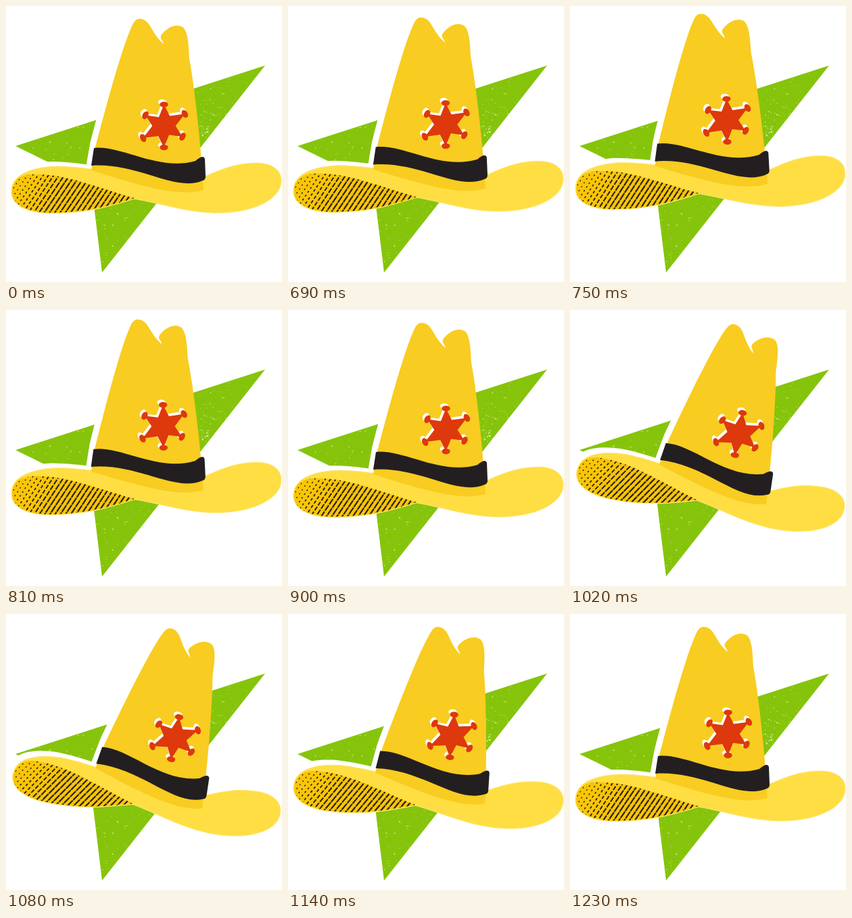
Recreate the animation shown at these times as an HTML page. Size 408 px wide and 408 px high, loop 1.8 s.

```html
<!DOCTYPE html>
<html lang="en">
<head>
<meta charset="utf-8">
<title>Sheriff hat</title>
<style>
  html, body { margin: 0; width: 100%; height: 100%; overflow: hidden; background: #fff; }
  svg { display: block; width: 100vw; height: 100vh; }
</style>
</head>
<body>
<svg viewBox="0 0 408 408">
  <defs>
    <path id="leaf" d="M14 207L383 88 142 394 126 262Z"/>
    <path id="crown" d="M126 243L132 209C150 140 172 60 186 30C190 21 193 19 198 19S208 22 212 28
      C218 38 224 49 233 56C232 50 226 48 230 42C240 30 252 26 261 31C270 38 270 62 271 78
      C278 115 288 200 292 272C255 283 200 266 126 243Z"/>
    <path id="brim" d="M8 272C10 246 44 238 75 237C150 238 240 268 294 252C325 238 345 232 372 232
      C396 233 407 244 407 258C407 284 370 306 310 306C265 305 230 292 190 285
      C150 297 120 306 70 306.5C30 307 6 294 8 272Z"/>
    <path id="under" d="M9 276C10 250 30 248 50 249C95 250 145 272 190 284
      C150 296 120 305 70 305.5C30 306 10 293 9 276Z"/>
    <g id="badge"></g>
    <clipPath id="leafClip"><use href="#leaf"/></clipPath>
    <clipPath id="underClip"><use href="#under"/></clipPath>
  </defs>
  <use href="#leaf" fill="#86c40b"/>
  <path id="specks" clip-path="url(#leafClip)" fill="#d3eaa6"/>
  <g id="hat">
    <g fill="#fff" transform="translate(-7.5 -7)">
      <use href="#crown"/><use href="#brim"/>
    </g>
    <use href="#brim" fill="#fede43" stroke="#ffe778"/>
    <use href="#under" fill="#f8c507"/>
    <g id="hatch" clip-path="url(#underClip)" stroke="#2b2112"></g>
    <use href="#crown" fill="#f8cc21"/>
    <path fill="#231f20" d="M130 210C170 205 225 245 280 229Q292 219 294 226L295 252Q295 257 291 258
      C250 276 195 231 126 236Z"/>
    <use href="#badge" fill="#fff" transform="translate(-2.5 -3.5)"/>
    <use href="#badge" fill="#dd390c"/>
  </g>
</svg>
<script>
const el = id => document.getElementById(id);

function add(parent, tag, attrs) {
  const node = document.createElementNS('http://www.w3.org/2000/svg', tag);
  for (const key in attrs) node.setAttribute(key, attrs[key]);
  parent.appendChild(node);
}

let seed = 71;
const rand = () => (seed = seed * 16807 % 2147483647) / 2147483647;

// Worn print: small random chips over the green shape, plus one dense patch.
function chips(count, x, y, w, h, size) {
  let d = '';
  for (let i = 0; i < count; i++) {
    const s = 0.35 + rand() * rand() * size;
    d += `M${x + rand() * w} ${y + rand() * h}l${s} ${-s * rand()}l${s * 0.4} ${s}l${-s} ${s * 0.3}z`;
  }
  return d;
}
el('specks').setAttribute('d',
  chips(1500, 14, 88, 369, 306, 1.6) + chips(24, 284, 176, 16, 18, 2.6));

// Hatching: loose dots at the left rim grow into solid strokes.
for (let x = -16; x < 195; x += 7.8) {
  const ink = Math.min(1, Math.max(0, (x + 16) / 70));
  add(el('hatch'), 'path', {
    d: `M${x} 309l42 -62`,
    'stroke-width': 1.4 + 0.8 * ink,
    'stroke-dasharray': `${1.8 + 10 * ink * ink} ${5.5 - 4.6 * ink}`,
    'stroke-dashoffset': rand() * 9
  });
}

// Six-pointed badge, a little longer along its -30 degree axis.
const hub = { x: 233.5, y: 177.3 };
function polar(deg, radius) {
  const a = deg * Math.PI / 180;
  const r = radius * (1 + 0.08 * Math.cos(2 * a + Math.PI / 3));
  return [hub.x + r * Math.cos(a), hub.y + r * Math.sin(a)];
}
const outline = [];
for (let deg = -90; deg < 270; deg += 60) {
  const [cx, cy] = polar(deg, 33);
  outline.push([cx, cy], polar(deg + 30, 16.5));
  add(el('badge'), 'ellipse', {
    cx, cy, rx: 6.2, ry: 4.2, transform: `rotate(${deg + 90} ${cx} ${cy})`
  });
}
add(el('badge'), 'path', { d: `M${outline.join('L')}Z` });

// Eased rise from 0 to 1 at the peak, then back to 0.
function swing(t, from, peak, to) {
  if (t <= from || t >= to) return 0;
  const p = t < peak ? (t - from) / (peak - from) : (to - t) / (to - peak);
  return (1 - Math.cos(Math.PI * p)) / 2;
}

const LOOP = 1800, STEP = 30;
const start = performance.now();

function draw() {
  const t = Math.floor((performance.now() - start) % LOOP / STEP) * STEP;
  const hop = swing(t, 660, 750, 900);
  const tip = swing(t, 900, 1050, 1230);
  el('hat').setAttribute('transform',
    `translate(0 ${-7.8 * hop}) rotate(${11.5 * tip - hop} 208.5 268)`);
  requestAnimationFrame(draw);
}
draw();
</script>
</body>
</html>
```
